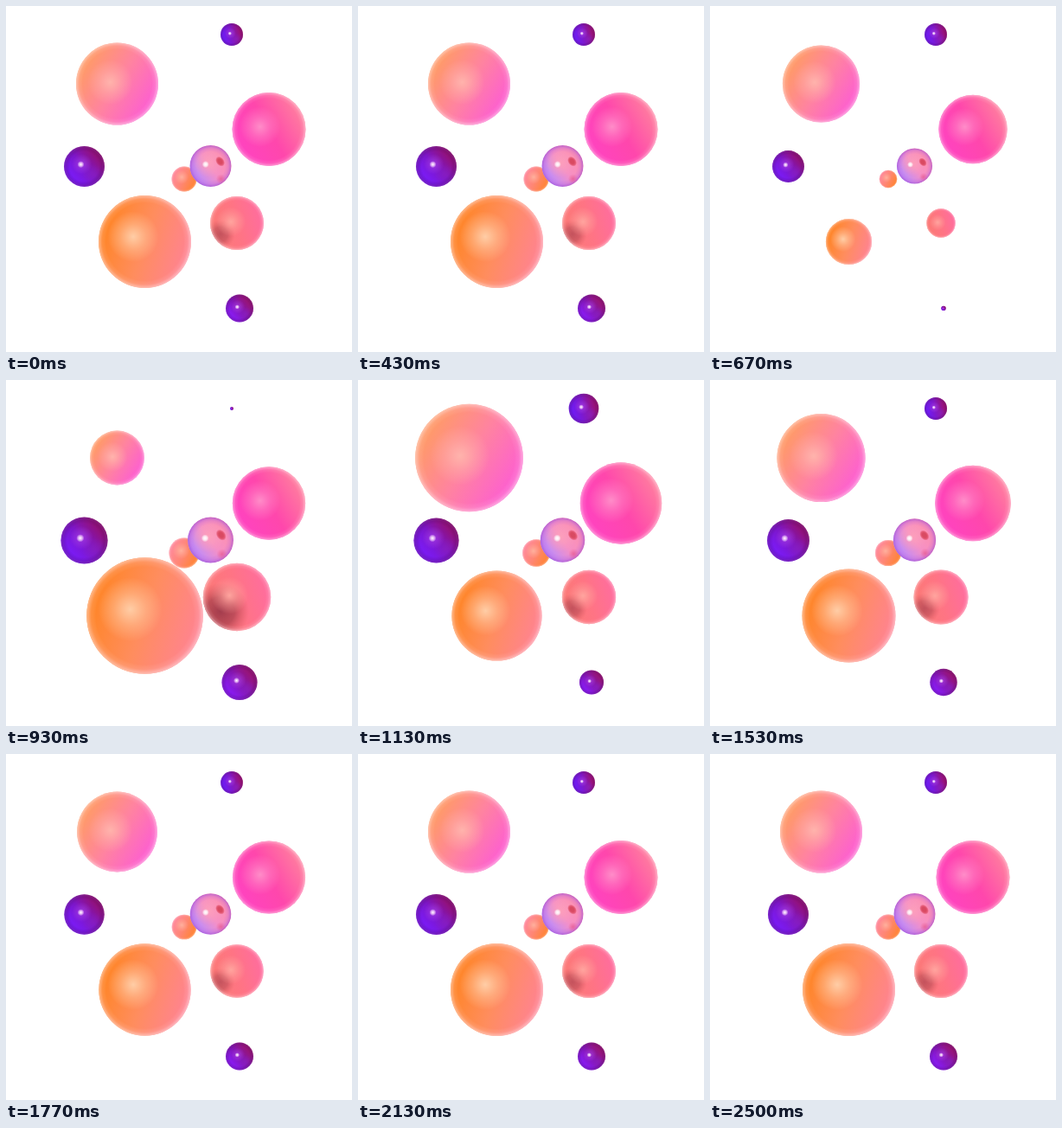
These frames come from a looping animation (400 px wide and 400 px high, 2530 ms). An HTML page with a canvas:

```html
<!DOCTYPE html>
<html>
<head>
<meta charset="utf-8">
<style>
html, body { margin: 0; width: 100%; height: 100%; overflow: hidden; background: #fff; }
canvas { display: block; width: 400px; height: 400px; }
</style>
</head>
<body>
<canvas id="stage" width="400" height="400"></canvas>
<script>
const ctx = document.getElementById('stage').getContext('2d');
const LOOP = 2530;

// Shared bounce: [time, displacement]; each ball adds its own delay and depth.
const BOUNCE = [[430, 0], [700, -1], [880, .38], [1150, -.15], [1340, .08], [1560, -.025], [1800, 0]];
const easeInOut = u => (1 - Math.cos(Math.PI * u)) / 2;
const easeOut = u => 1 - (1 - u) ** 3;

function bounce(t) {
  const i = BOUNCE.findIndex(key => t < key[0]);
  if (i < 1) return 0;
  const [t0, v0] = BOUNCE[i - 1], [t1, v1] = BOUNCE[i];
  const ease = i === 2 ? easeOut : easeInOut;
  return v0 + (v1 - v0) * ease((t - t0) / (t1 - t0));
}

// Colours run along the given angle (degrees) across each ball.
const balls = [
  { x: 128.5, y: 90, r: 47.5, delay: 197, depth: .95, angle: 32, colors: ['#ff9b66', '#ff83a0', '#fd5fd0'], glow: [-.17, -.04, '#ffb3ac'], soft: true },
  { x: 304, y: 142.5, r: 42.5, delay: 170, depth: .41, angle: -30, colors: ['#ff43c0', '#ff47ac', '#ff7c9f'], glow: [-.24, -.07, '#ff8cc8'], soft: true },
  { x: 160.5, y: 272.5, r: 53.5, delay: 63, depth: .68, angle: 18, colors: ['#ff8526', '#ff8d5e', '#ff8390'], glow: [-.25, -.11, '#ffcda6'], soft: true },
  { x: 267, y: 251, r: 31, delay: 80, depth: .71, angle: -15, colors: ['#fb7a76', '#ff7484', '#ff6d9e'], glow: [-.22, -.05, '#ffa49e'], soft: true, shade: true },
  { x: 206, y: 200, r: 14.5, delay: 122, depth: .71, angle: 25, colors: ['#ff8a9c', '#ff8672', '#ff8434'], glow: [-.2, -.15, '#ffb09c'], soft: true },
  { x: 90.5, y: 185.5, r: 23.5, delay: 135, depth: .64, angle: -42, colors: ['#7a1cff', '#7d16c8', '#97106a'] },
  { x: 270, y: 349.5, r: 16, delay: 0, depth: .85, angle: -40, colors: ['#8a1cff', '#8416b4', '#9c1468'] },
  { x: 261, y: 33, r: 13, delay: 265, depth: .88, angle: -15, colors: ['#6c1cff', '#8018c4', '#a01066'] },
  { x: 236.5, y: 185, r: 24, delay: 135, depth: .43, angle: -35, colors: ['#b98cff', '#f590c6', '#ff91ad'], glass: true }
];

function disc(x, y, r, fill) {
  ctx.fillStyle = fill;
  ctx.beginPath();
  ctx.arc(x, y, r, 0, 2 * Math.PI);
  ctx.fill();
}

function blend(gradient, colors) {
  colors.forEach((c, i) => gradient.addColorStop(i / (colors.length - 1), c));
  return gradient;
}

const radial = (x, y, r0, r1, ...colors) => blend(ctx.createRadialGradient(x, y, r0, x, y, r1), colors);

function drawBall(ball, t) {
  const scale = 1 + ball.depth * bounce(t - ball.delay);
  const size = Math.max(ball.r * scale, .1);
  const angle = ball.angle * Math.PI / 180;
  const dx = Math.cos(angle), dy = Math.sin(angle);

  ctx.save();
  ctx.translate(ball.x, ball.y);
  ctx.scale(size, size);
  disc(0, 0, 1, blend(ctx.createLinearGradient(-dx * .95, -dy * .95, dx * .95, dy * .95), ball.colors));
  ctx.clip();

  if (ball.shade) {
    const reach = Math.max(.1, .55 + (scale - 1) * 1.1);
    const alpha = Math.min(.8, Math.max(0, .5 + (scale - 1) * 1.1));
    disc(-.62 + (scale - 1) * .5, .42, reach, radial(-.62 + (scale - 1) * .5, .42, 0, reach,
      `rgba(140,45,65,${alpha})`, `rgba(150,50,65,${alpha * .75})`, 'rgba(200,70,85,0)'));
  }

  if (ball.soft) {
    const [gx, gy, color] = ball.glow;
    disc(gx, gy, .55, radial(gx, gy, 0, .55, color, color + '70', color + '00'));
    disc(0, 0, 1, radial(0, 0, .84, 1, 'rgba(255,255,255,0)', 'rgba(255,225,235,.12)', 'rgba(255,240,245,.5)'));
  } else if (ball.glass) {
    disc(-.1, -.15, .7, radial(-.1, -.15, 0, .7, '#ffa3b8cc', '#ffa3b800'));
    disc(0, 0, 1, radial(0, 0, .68, 1, 'rgba(190,100,220,0)', 'rgba(190,100,220,.28)', 'rgba(165,85,210,.75)'));
    ctx.save();
    ctx.translate(.46, -.22);
    ctx.rotate(.9);
    ctx.scale(1, .72);
    disc(0, 0, .27, radial(0, 0, .12, .27, '#d94a62', '#e0506ad0', '#e0506a00'));
    ctx.restore();
    disc(.5, .62, .24, radial(.5, .62, 0, .24, '#e8588cb0', '#e8588c00'));
    disc(-.24, -.08, .17, radial(-.24, -.08, 0, .17, '#fff', '#ffffffc0', '#ffffff00'));
  } else {
    disc(.4, .38, .5, radial(.4, .38, 0, .5, '#8a20c0a0', '#8a20c000'));
    disc(-.12, -.12, .5, radial(-.12, -.12, 0, .5, '#b850f090', '#b850f000'));
    disc(0, 0, 1, radial(0, 0, .72, 1, 'rgba(80,10,110,0)', 'rgba(80,10,110,.22)', 'rgba(130,60,150,.55)'));
    disc(-.17, -.1, .17, radial(-.17, -.1, 0, .17, '#fff', '#ffe0ffb0', '#ffffff00'));
  }
  ctx.restore();
}

function frame(now) {
  const t = now % LOOP;
  ctx.clearRect(0, 0, 400, 400);
  balls.forEach(ball => drawBall(ball, t));
  requestAnimationFrame(frame);
}
frame(performance.now());
</script>
</body>
</html>
```
